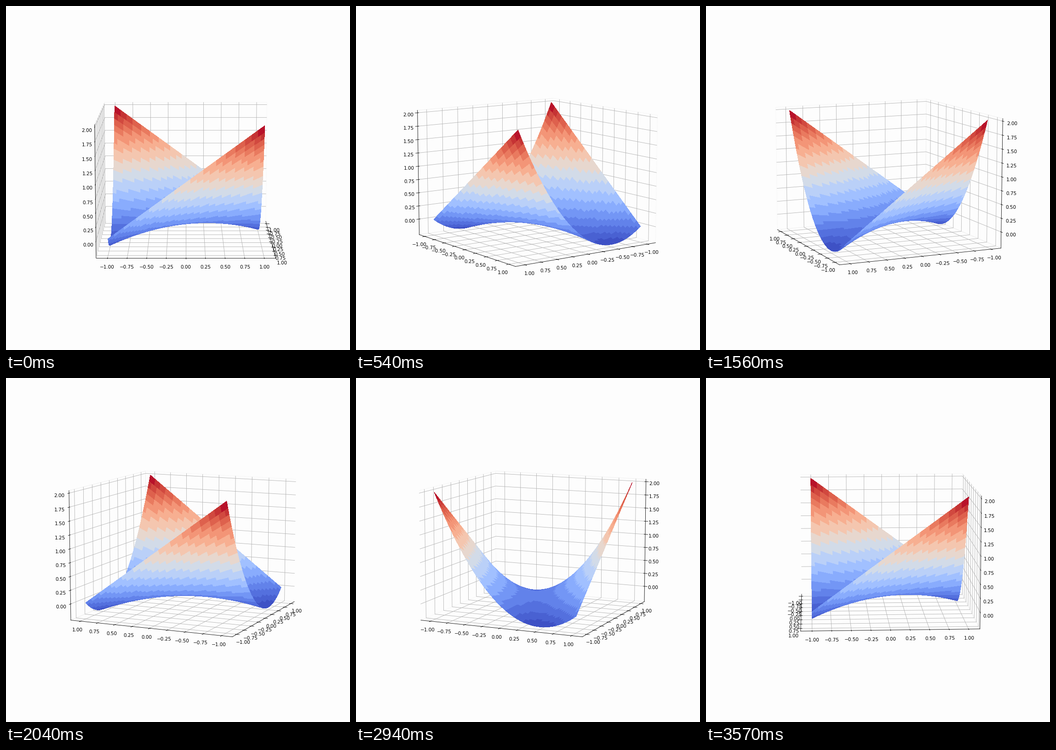
These frames come from a looping animation (748x748 px, 3600 ms). A matplotlib script:

```python
import numpy as np
import matplotlib.pyplot as plt
from matplotlib.animation import FuncAnimation
from matplotlib.colors import BoundaryNorm, ListedColormap

FRAMES = 120
INTERVAL = 30
ELEV = 10
BANDS = 18
BACKGROUND = "0.992"


def banded_coolwarm(low, high):
    """Coolwarm in flat bands that are widest around the middle."""
    u = np.linspace(0, 1, BANDS + 1)
    edges = u - 0.45 * np.sin(2 * np.pi * u) / (2 * np.pi)
    mids = (edges[:-1] + edges[1:]) / 2
    cmap = ListedColormap(plt.get_cmap("coolwarm")(mids))
    return cmap, BoundaryNorm(low + (high - low) * edges, BANDS)


fig = plt.figure(figsize=(10, 10), dpi=74.8, facecolor=BACKGROUND)
ax = fig.add_subplot(projection="3d", facecolor=BACKGROUND)
ax.margins(x=0.05, y=0.05, z=0)

side = np.linspace(-1, 1, 50)
x, y = np.meshgrid(side, side)
z = x**2 + x * y

cmap, norm = banded_coolwarm(-0.25, 1.92)
ax.plot_surface(x, y, z, cmap=cmap, norm=norm, linewidth=0,
                antialiased=False, rcount=50, ccount=50)

ax.set_zticks(np.linspace(0, 2, 9))
for axis in (ax.xaxis, ax.yaxis, ax.zaxis):
    axis.pane.fill = False
    plt.setp(axis.get_ticklabels(), va="top")


def update(i):
    ax.view_init(elev=ELEV, azim=i * 360 / FRAMES)
    return ()


anim = FuncAnimation(fig, update, frames=FRAMES, interval=INTERVAL,
                     init_func=lambda: update(0), repeat=True,
                     repeat_delay=0, blit=False)
plt.show()
```
